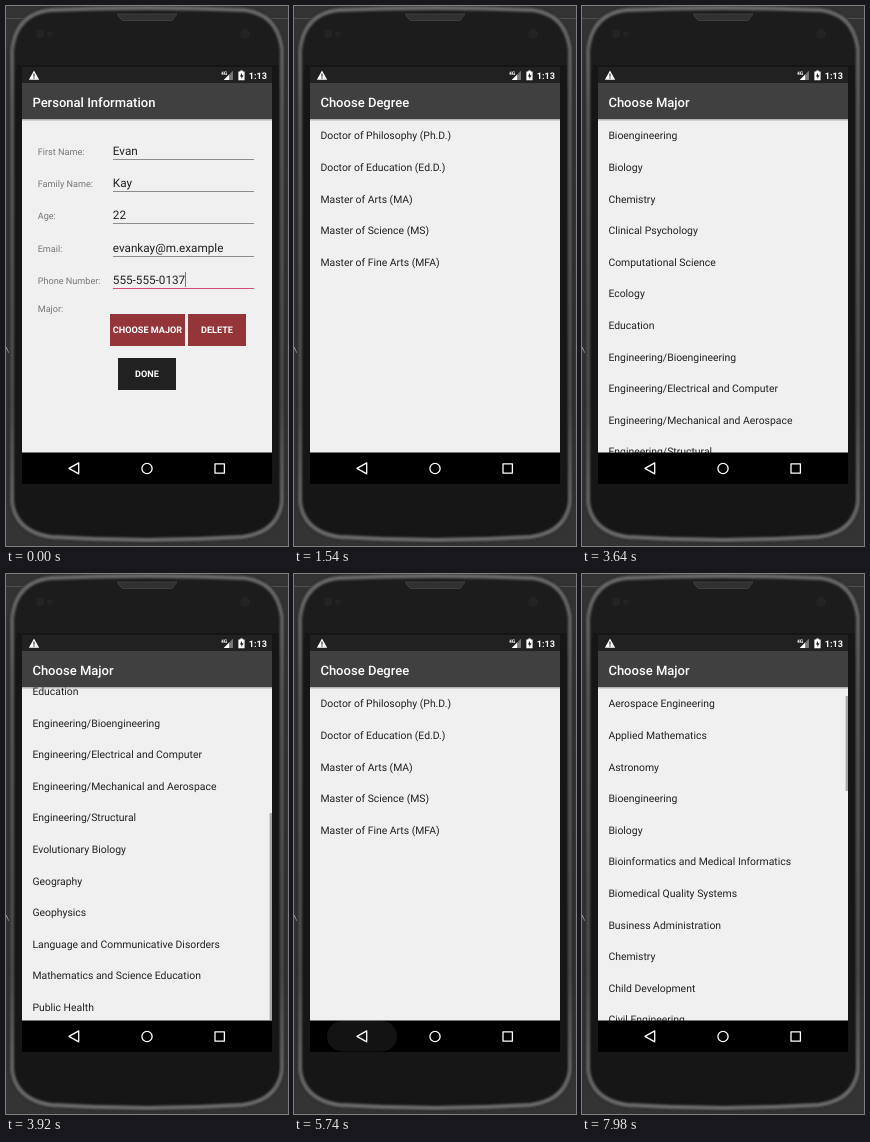
These frames come from a looping animation (282 px wide and 540 px high, 8000 ms). An HTML page:

```html
<!DOCTYPE html>
<html lang="en">
<head>
<meta charset="utf-8">
<title>Degree picker</title>
<style>
html, body { margin: 0; width: 100%; height: 100%; overflow: hidden; background: #333; }
svg { display: block; width: 282px; height: 540px; }
text { font-family: Roboto, "Noto Sans", sans-serif; text-rendering: geometricPrecision; white-space: pre; }
.title { font-size: 13.03px; font-weight: 500; fill: #fff; }
.item { font-size: 10.42px; fill: #212121; }
.label { font-size: 9.12px; fill: #777; }
.field { font-size: 11.73px; fill: #212121; }
.button { font-size: 9.12px; font-weight: 700; fill: #fff; text-anchor: middle; }
</style>
</head>
<body>
<svg id="stage" viewBox="0 0 282 540" xmlns="http://www.w3.org/2000/svg">
  <defs>
    <linearGradient id="rim" x1="0" y1="0" x2="0" y2="1">
      <stop offset="0" stop-color="#6c6c6c"/>
      <stop offset=".2" stop-color="#585858"/>
      <stop offset=".75" stop-color="#4c4c4c"/>
      <stop offset="1" stop-color="#6e6e6e"/>
    </linearGradient>
    <linearGradient id="body" x1="0" y1="0" x2="0" y2="1">
      <stop offset="0" stop-color="#202020"/>
      <stop offset=".12" stop-color="#191919"/>
      <stop offset="1" stop-color="#171717"/>
    </linearGradient>
    <linearGradient id="shade" x1="0" y1="0" x2="0" y2="1">
      <stop offset="0" stop-color="#000" stop-opacity=".3"/>
      <stop offset="1" stop-color="#000" stop-opacity="0"/>
    </linearGradient>
    <filter id="soft" filterUnits="userSpaceOnUse" x="0" y="0" width="282" height="540">
      <feGaussianBlur stdDeviation="1"/>
    </filter>
    <clipPath id="window"><rect x="16" y="77" width="250" height="370"/></clipPath>
    <clipPath id="listArea"><rect x="16" y="113" width="250" height="334"/></clipPath>
    <path id="shell" d="M44 4Q141 0 238 4Q272 8 276 44V496Q272 526 237 531Q141 537 45 531Q10 526 6 496V44Q10 8 44 4Z"/>
  </defs>

  <!-- phone -->
  <rect width="282" height="540" fill="#333"/>
  <path d="M0 12.5H20M258 12.5H282" stroke="#505050"/>
  <path d="M0 341l3 6" stroke="#a0a0a0"/>
  <use href="#shell" fill="url(#body)" stroke="#1c1c1c" stroke-width="5" filter="url(#soft)"/>
  <use href="#shell" fill="none" stroke="url(#rim)" stroke-width="4" filter="url(#soft)"/>
  <path d="M111 8L116 14.5H166L171 8Z" fill="#303030" stroke="#444" stroke-width=".8"/>
  <g fill="#232323"><circle cx="34" cy="28" r="4"/><circle cx="44" cy="28" r="3"/><circle cx="239" cy="28" r="5"/></g>

  <rect x="16" y="61" width="250" height="417" fill="#000"/>
  <g id="pages" clip-path="url(#window)"></g>

  <!-- status bar -->
  <rect x="16" y="61" width="250" height="16" fill="#212121"/>
  <path d="M28 64.6L33.2 73.8H22.8Z" fill="#fff"/>
  <path d="M28 67.6V70.7M28 71.6V72.7" stroke="#212121" stroke-width="1.1"/>
  <path d="M227 64.8V74H217.8Z" fill="#777"/>
  <path d="M223.2 68.6V74H217.8Z" fill="#fff"/>
  <text x="215" y="69" font-size="5" font-weight="700" fill="#fff">4G</text>
  <path d="M234.2 64.4h2.6v1h1.8v8.9h-6.2v-8.9h1.8Z" fill="#fff"/>
  <path d="M236 66.8l-2.2 3.6h1.5v2.6l2.2-3.7H236Z" fill="#212121"/>
  <text x="242.7" y="72.6" font-size="9.12" font-weight="700" fill="#fff">1:13</text>

  <!-- navigation bar -->
  <rect x="16" y="446.5" width="250" height="31.5" fill="#000"/>
  <rect id="backGlow" x="33" y="447" width="70" height="30.5" rx="15" fill="#141414"/>
  <g fill="none" stroke="#fff" stroke-width="1.3" stroke-linejoin="round">
    <path d="M63 462.4L72.7 456.9V467.9Z"/>
    <circle cx="141" cy="462.5" r="5.1"/>
    <rect x="209" y="457.8" width="9.4" height="9.4"/>
  </g>
</svg>
<script>
const LOOP = 8000;
const ROW = 31.6;
const $ = id => document.getElementById(id);

const text = (cls, x, y, str) => `<text class="${cls}" x="${x}" y="${y}">${str}</text>`;
const rect = (x, y, w, h, fill, extra = '') =>
  `<rect x="${x}" y="${y}" width="${w}" height="${h}" fill="${fill}" ${extra}/>`;

const page = (id, title, content) => `<g id="${id}">
  ${rect(16, 77, 250, 370, '#f0f0f0')}
  ${content}
  ${rect(16, 113, 250, 2.5, 'url(#shade)')}
  ${rect(16, 77, 250, 36, '#404040')}
  ${text('title', 26.4, 101.2, title)}</g>`;

const list = (id, items) => `<g clip-path="url(#listArea)"><g id="${id}">
  ${items.map((s, i) => text('item', 26.4, 133.4 + i * ROW, s)).join('')}</g></g>`;

const thumb = (id, y, h) => rect(263.6, y, 2.4, h, '#a8a8a8', `id="${id}"`);

const button = (x, y, w, h, fill, str) =>
  rect(x, y, w, h, fill) + text('button', x + w / 2, y + h / 2 + 3.4, str);

const rows = [
  ['First Name:', 'Evan'],
  ['Family Name:', 'Kay'],
  ['Age:', '22'],
  ['Email:', 'evankay@m.example'],
  ['Phone Number:', '555-555-0137']
];

const form = rows.map(([name, value], i) => {
  const y = Math.round(149 + i * 32.2), active = i === 4;
  return text('label', 31.7, y, name) + text('field', 106.8, y, value) +
    rect(107, y + 4, 141, 1, active ? '#d8487f' : '#8c8c8c');
}).join('') +
  rect(179, 266, 1, 15, '#e0407c', 'id="caret"') +
  text('label', 31.7, 305.6, 'Major:') +
  button(104, 308, 75, 32, '#943539', 'CHOOSE MAJOR') +
  rect(104, 308, 75, 32, '#fff', 'id="press"') +
  button(182, 308, 58, 32, '#943539', 'DELETE') +
  button(112, 352, 58, 32, '#212121', 'DONE');

const degrees = ['Doctor of Philosophy (Ph.D.)', 'Doctor of Education (Ed.D.)',
  'Master of Arts (MA)', 'Master of Science (MS)', 'Master of Fine Arts (MFA)'];

const doctoral = ['Bioengineering', 'Biology', 'Chemistry', 'Clinical Psychology',
  'Computational Science', 'Ecology', 'Education', 'Engineering/Bioengineering',
  'Engineering/Electrical and Computer', 'Engineering/Mechanical and Aerospace',
  'Engineering/Structural', 'Evolutionary Biology', 'Geography', 'Geophysics',
  'Language and Communicative Disorders', 'Mathematics and Science Education', 'Public Health'];

const masters = ['Aerospace Engineering', 'Applied Mathematics', 'Astronomy', 'Bioengineering',
  'Biology', 'Bioinformatics and Medical Informatics', 'Biomedical Quality Systems',
  'Business Administration', 'Chemistry', 'Child Development', 'Civil Engineering'];

$('pages').innerHTML =
  page('formPage', 'Personal Information', form) +
  page('degreePage', 'Choose Degree', list('degreeList', degrees)) +
  page('doctoralPage', 'Choose Major', list('doctoralList', doctoral) + thumb('doctoralThumb', 114, 207)) +
  page('mastersPage', 'Choose Major', list('mastersList', masters) + thumb('mastersThumb', 122, 95));

// steps: [time, value, easing towards the next step]
function play(id, prop, steps, easing = 'linear') {
  const all = [...steps, [LOOP, steps[steps.length - 1][1]]];
  const frames = all.map(([t, v, e]) => ({ offset: t / LOOP, [prop]: v, easing: e || easing }));
  $(id).animate(frames, { duration: LOOP, iterations: Infinity });
}
const cut = (id, steps) => play(id, 'opacity', steps, 'steps(1, end)');
const slide = (id, steps, scale = 1) =>
  play(id, 'transform', steps.map(([t, y, e]) => [t, `translateY(${y * scale}px)`, e]));

cut('caret', [[0, 1], [280, 0], [770, 1]]);
play('press', 'opacity', [[0, 0], [770, 0], [880, .18], [1000, .18], [1150, 0]]);

// the degree screen opens as a new window, later screens swap at once
play('degreePage', 'opacity', [[0, 0], [980, 0], [1180, 1]]);
slide('degreePage', [[0, 32], [980, 32, 'cubic-bezier(.1,.7,.2,1)'], [1320, 0]]);
cut('doctoralPage', [[0, 0], [2940, 1], [5600, 0]]);
cut('mastersPage', [[0, 0], [7000, 1]]);

const scroll = [[0, 0], [3650, 0, 'cubic-bezier(.3,.3,.5,1)'], [3920, -202], [4060, -205],
  [4410, -205, 'ease-in-out'], [4760, -196]];
slide('doctoralList', scroll);
slide('doctoralThumb', scroll, -125 / 202);
play('doctoralThumb', 'opacity', [[0, 0], [3650, 0], [3700, 1], [4760, 1], [5020, 0]]);
cut('mastersThumb', [[0, 0], [7840, 1]]);
play('backGlow', 'opacity', [[0, 0], [5320, 0], [5450, 1], [5740, 1], [5950, 0]]);
</script>
</body>
</html>
```
